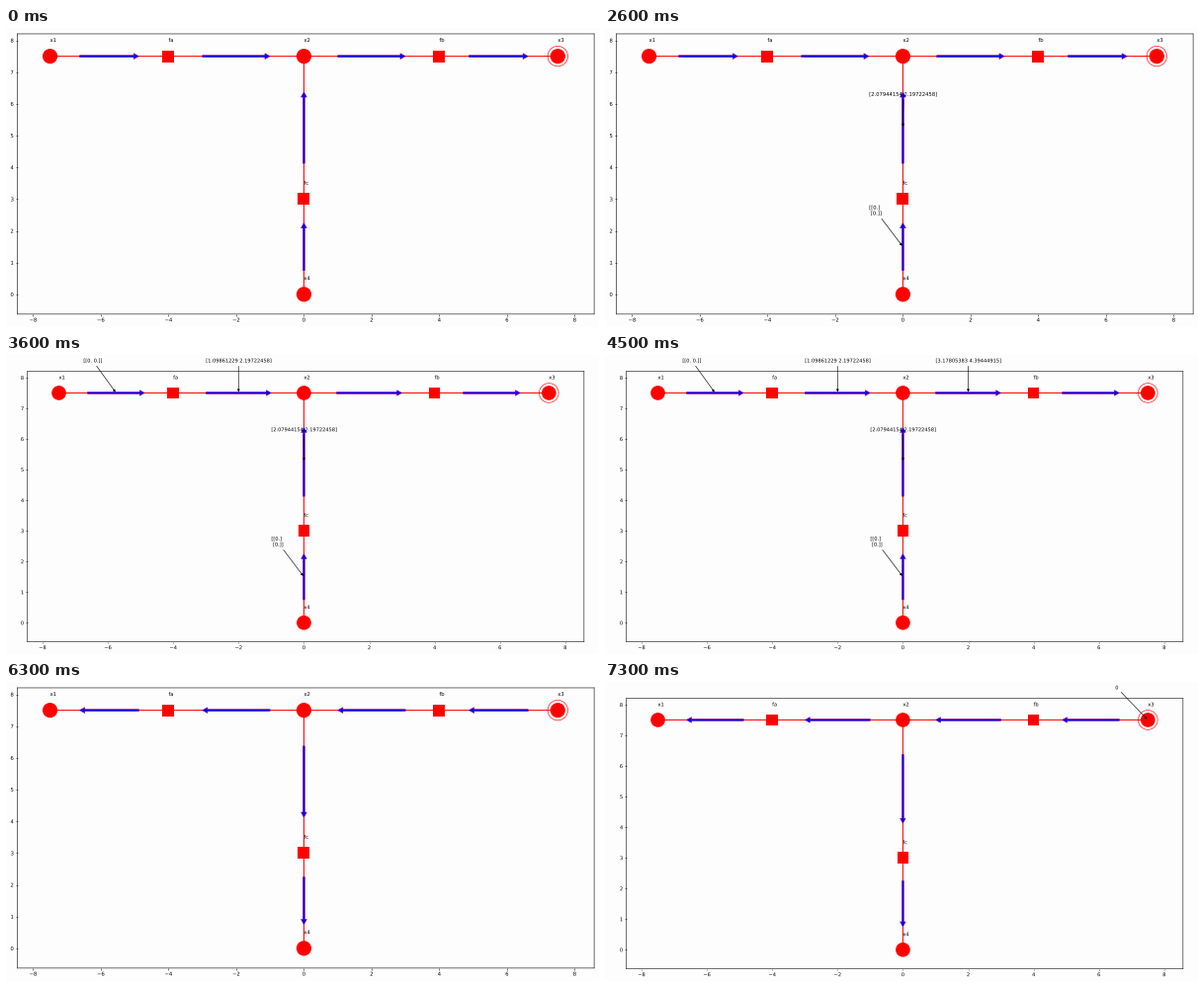
These frames come from a looping animation (600x303 px, 8000 ms). A matplotlib script:

```python
import matplotlib.pyplot as plt
from matplotlib.animation import FuncAnimation
from matplotlib.patheffects import Normal

W, H, DPI = 600, 303, 72
PAPER = "#fefdfe"
STEP = 9            # ticks of 100 ms between two messages
UNIT = 0.523        # pixels per point at full zoom

# the path effect draws text as outlines, free of the pixel grid
plt.rcParams.update({
    "font.family": "DejaVu Sans",
    "path.snap": False,
    "path.effects": [Normal()],
})

VARS = {"x1": (-7.5, 7.5), "x2": (0, 7.5), "x3": (7.5, 7.5), "x4": (0, 0)}
FACTORS = {"fa": (-4, 7.5), "fb": (4, 7.5), "fc": (0, 3)}
NODES = {**VARS, **FACTORS}
EDGES = [("x1", "fa"), ("fa", "x2"), ("x2", "fb"), ("fb", "x3"),
         ("x4", "fc"), ("fc", "x2")]

# messages in the order they are sent towards the root
MESSAGES = [
    ("x4", "fc", "[[0.]\n [0.]]"),
    ("fc", "x2", "[2.07944154 2.19722458]"),
    ("x1", "fa", "[[0. 0.]]"),
    ("fa", "x2", "[1.09861229 2.19722458]"),
    ("x2", "fb", "[3.17805383 4.39444915]"),
    ("fb", "x3", "[6.00388707 4.56434819]"),
]
TURN = len(MESSAGES) + 1

fig = plt.figure(figsize=(W / DPI, H / DPI), dpi=DPI, facecolor=PAPER)
ax = fig.add_axes([0, 0, 1, 1])


def between(a, b, t):
    (x0, y0), (x1, y1) = NODES[a], NODES[b]
    return x0 + (x1 - x0) * t, y0 + (y1 - y0) * t


def set_axes(zoom):
    u = UNIT * zoom
    left, right = (301.4 + zoom * (x - 301.4) for x in (11.5, 595.1))
    bottom = 289.9 if zoom == 1 else 290.6
    top = bottom - zoom * 283.95
    ax.clear()
    ax.set_facecolor(PAPER)
    ax.set_position([left / W, 1 - bottom / H,
                     (right - left) / W, (bottom - top) / H])
    ax.set_xlim(-8.465, 8.575)
    ax.set_ylim(-0.622, 8.205)
    ax.set_xticks(range(-8, 9, 2))
    ax.set_yticks(range(9))
    ax.tick_params(length=3.5 * u, width=u, pad=3.5 * u, labelsize=10 * u)
    for spine in ax.spines.values():
        spine.set_linewidth(1.1 * u)


def draw_edge(a, b, u, back):
    xs, ys = zip(NODES[a], NODES[b])
    ax.plot(xs, ys, color="red", lw=2 * u, zorder=2)
    tail, tip = (0.75, 0.25) if back else (0.25, 0.75)
    ax.annotate("", xy=between(a, b, tip), xytext=between(a, b, tail),
                zorder=3, arrowprops=dict(
                    arrowstyle=f"simple,tail_width={3.6 * u},"
                               f"head_width={11 * u},head_length={10 * u}",
                    mutation_scale=1, shrinkA=0, shrinkB=0,
                    fc="blue", ec="#8a0070", lw=u))


def draw_nodes(u):
    xs, ys = zip(*VARS.values())
    ax.plot(xs, ys, "o", color="red", ms=29 * u, mew=0, zorder=4)
    xs, ys = zip(*FACTORS.values())
    ax.plot(xs, ys, "s", color="red", ms=23 * u, mew=0, zorder=4)
    ax.plot(*NODES["x3"], "o", mfc="none", mec="red", mew=1.2 * u,
            ms=39 * u, zorder=4)
    for name, (x, y) in NODES.items():
        ax.text(x, y + 0.5, name, size=10 * u, va="center", zorder=5)


def draw_note(text, point, u):
    x, y = point
    ax.annotate(text, xy=point, xytext=(x - 1, y + 1), size=10 * u, zorder=6,
                annotation_clip=False, arrowprops=dict(
                    arrowstyle="-|>", fc="black", lw=1.2 * u,
                    mutation_scale=10 * u, shrinkA=2 * u, shrinkB=2 * u))


def draw(i):
    step = i // STEP
    back = step >= TURN
    # the view shrinks once a note sticks out above the plot
    zoom = 0.9651 if 3 <= step < TURN or step > TURN else 1
    u = UNIT * zoom
    set_axes(zoom)
    for a, b in EDGES:
        draw_edge(a, b, u, back)
    draw_nodes(u)
    if not back:
        for a, b, text in MESSAGES[:step]:
            draw_note(text, between(a, b, 0.5), u)
    elif step > TURN:
        draw_note("0", NODES["x3"], u)
    return []


anim = FuncAnimation(fig, draw, frames=80, interval=100, repeat=True,
                     repeat_delay=0, init_func=lambda: [])
plt.show()
```
